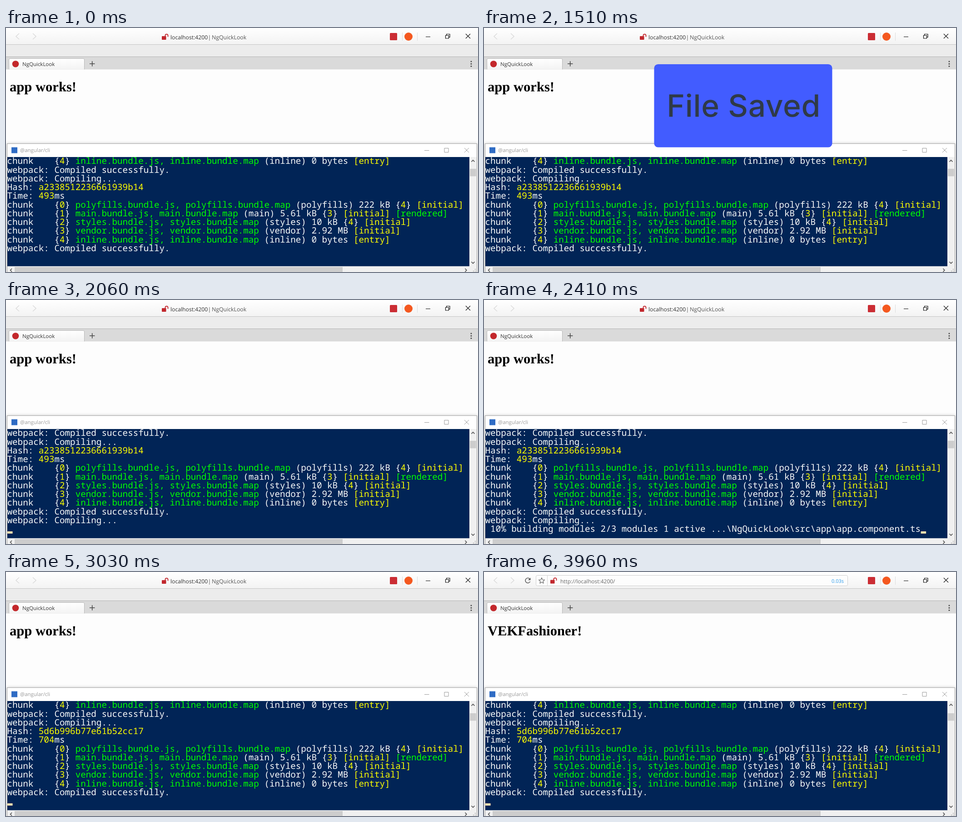
An HTML page for the animation above (5000 ms loop, 1039 px wide and 539 px high).

```html
<!DOCTYPE html>
<html lang="en">
<head>
<meta charset="utf-8">
<title>Live reload</title>
<style>
html, body { margin: 0; width: 100%; height: 100%; overflow: hidden; background: #fdfdfd; }
svg { display: block; width: 1039px; height: 539px; }
text { white-space: pre; text-rendering: geometricPrecision; }
.ui { font-family: "Open Sans", "Noto Sans", sans-serif; }
.page { font-family: "Liberation Serif", "Noto Serif", serif; fill: #000; }
.h1 { font-weight: bold; font-size: 30.6px; }
.term { font: 500 19.25px "Noto Sans Mono", "DejaVu Sans Mono", monospace; fill: #fafafa; }
.y { fill: #ff0; }
.g { fill: #0f0; }
.line { fill: none; stroke-width: 1.2; }
.window { filter: drop-shadow(0 0 3px rgba(0, 0, 0, .22)); }
</style>
</head>
<body>
<svg viewBox="0 0 1039 539">
  <defs>
    <linearGradient id="bar" x2="0" y2="1">
      <stop stop-color="#fff"/><stop offset="1" stop-color="#f3f3f3"/>
    </linearGradient>
    <g id="lock">
      <rect y="5" width="9.5" height="8" rx="1" fill="#c1272d"/>
      <path d="M7.5 6V3.6a3 3 0 0 1 6 0V6.5" class="line" stroke="#c1272d" style="stroke-width:1.8"/>
    </g>
  </defs>

  <!-- browser chrome -->
  <rect width="1039" height="539" fill="#fdfdfd"/>
  <rect width="1039" height="36" fill="url(#bar)"/>
  <rect y="36" width="1039" height="27" fill="#ececec"/>
  <rect y="36" width="1039" height="1" fill="#c4c4c4"/>
  <rect y="63" width="1039" height="28.5" fill="#dadada"/>
  <rect y="63" width="1039" height="1" fill="#b4b4b4"/>
  <path d="M6.5 91.5V70q0-2.5 2.5-2.5h161q2.5 0 2.5 2.5v21.5" fill="url(#bar)" stroke="#b8b8b8"/>
  <g class="line" stroke="#dcdcdc" style="stroke-width:1.6">
    <path d="M29 12l-7 6.5 7 6.5M59 12l7 6.5-7 6.5"/>
    <path d="M872.5 10v18M905.5 10v18" stroke-width="1"/>
  </g>
  <rect x="845" y="11" width="16" height="16" rx="1.5" fill="#cb2d34"/>
  <circle cx="886" cy="19" r="9" fill="#f4581f"/>
  <g class="line" stroke="#111">
    <path d="M924 19.5h10M1012 13l10 10M1022 13l-10 10"/>
    <path d="M967.5 16.5h7v6.5h-7zM969.5 16v-2.5h7.5v7h-2"/>
  </g>
  <path d="M184 79h11.5M189.7 73.3v11.5" class="line" stroke="#444" style="stroke-width:1.5"/>
  <g fill="#444"><circle cx="1024" cy="74" r="1.5"/><circle cx="1024" cy="79.3" r="1.5"/><circle cx="1024" cy="84.6" r="1.5"/></g>
  <text class="ui" x="36" y="83.5" font-size="11.5" fill="#333">NgQuickLook</text>
  <circle id="favicon" cx="21" cy="79.5" r="7.3" fill="#c3272b"/>
  <circle id="spinner" cx="21" cy="79.5" r="5.3" class="line" stroke="#666" style="stroke-width:1.6" stroke-dasharray="28 5.3"/>

  <g id="titleBar" class="ui">
    <use href="#lock" x="343" y="13"/>
    <text x="362" y="24.5" font-size="12.2" font-weight="500" fill="#333">localhost:4200</text>
    <text x="444.5" y="24.5" font-size="12.2" fill="#555">|</text>
    <text x="453" y="24.5" font-size="12.3" fill="#555">NgQuickLook</text>
  </g>
  <g id="urlBar" class="ui">
    <rect x="114.5" y="7.5" width="686" height="23" rx="3" fill="#fdfdfd" stroke="#cfcfcf"/>
    <path d="M139.5 8v22" stroke="#d4d4d4"/>
    <path id="star" class="line" stroke="#666" stroke-linejoin="round"/>
    <use href="#lock" x="146" y="12.5"/>
    <text x="168" y="24.5" font-size="12" fill="#666">http://localhost:4200/</text>
    <text id="loadTime" x="765" y="24" font-size="11" fill="#2e9bea">0.03s</text>
  </g>
  <path id="stop" d="M91 13.5l11 11M102 13.5l-11 11" class="line" stroke="#5a5a5a" style="stroke-width:1.5"/>
  <g id="reload">
    <path d="M101 15.5a5.5 5.5 0 1 0 .6 5.5" class="line" stroke="#5a5a5a" style="stroke-width:1.6"/>
    <path d="M102.5 12.5v5.5h-5.5z" fill="#5a5a5a"/>
  </g>

  <!-- page -->
  <g class="page">
    <text id="before" class="h1" x="8" y="139.5">app works!</text>
    <text id="loading" x="7.5" y="113" font-size="15.3">Loading...</text>
    <text id="after" class="h1" x="8" y="139.5">VEKFashioner!</text>
  </g>

  <!-- terminal window -->
  <rect class="window" x="2.5" y="255.5" width="1034" height="290" fill="#fff" stroke="#a6a6a6"/>
  <rect x="12" y="263.5" width="13" height="13" fill="#2f6cc4"/>
  <text class="ui" x="31" y="274" font-size="11.4" fill="#999">@angular/cli</text>
  <path d="M921 270.5h10.5M965 265.5h9v9h-9zM1009 265l10 10M1019 265l-10 10" class="line" stroke="#999" style="stroke-width:1"/>
  <rect x="3" y="285" width="1017" height="241.5" fill="#012456"/>
  <rect x="1020" y="285" width="16" height="254" fill="#f0f0f0"/>
  <rect x="3" y="526.5" width="1033" height="13" fill="#f0f0f0"/>
  <rect id="thumb" x="1021" y="311" width="14" height="16.5" fill="#cdcdcd"/>
  <rect x="19" y="528" width="722" height="11" fill="#cdcdcd"/>
  <path d="M1024.5 295.5l3.5-3.5 3.5 3.5M1024.5 516.5l3.5 3.5 3.5-3.5M13 531.5l-3.5 3.5 3.5 3.5M1010.5 531.5l3.5 3.5-3.5 3.5" class="line" stroke="#505050" style="stroke-width:1.6"/>
  <path d="M1032 533h2M1028 537h2M1032 537h2" stroke="#b5b5b5" stroke-width="2"/>
  <g id="screen" class="term"></g>
  <rect id="cursor" y="511" width="11.5" height="5" fill="#fbe0b0"/>

  <!-- notice -->
  <g id="notice">
    <rect x="383" y="87.5" width="362" height="169.5" rx="8" fill="#425cff"/>
    <text x="565" y="195" text-anchor="middle" font-family="Inter, Lato, sans-serif" font-size="62.5" font-weight="500" letter-spacing=".6" fill="#2f3a47">File Saved</text>
  </g>
</svg>

<script>
const LOOP = 5000, CELL = 11.55, ROW = 19.27, LEFT = 2.5;
const $ = id => document.getElementById(id);
const show = (id, on) => { $(id).style.display = on ? "" : "none"; };

// terminal log
const paint = (c, s) => `<tspan class="${c}">${s}</tspan>`;
const y = s => paint("y", s), g = s => paint("g", s);
const chunk = (id, name, size, parent, flags) =>
  `chunk    {${y(id)}} ${g(`${name}.bundle.js, ${name}.bundle.map`)} (${name}) ${size} ` +
  (parent ? `{${y(parent)}} ` : "") + flags;
const first = y("[initial]");
const chunks = [
  chunk(0, "polyfills", "222 kB", 4, first),
  chunk(1, "main", "5.61 kB", 3, `${first} ${g("[rendered]")}`),
  chunk(2, "styles", "10 kB", 4, first),
  chunk(3, "vendor", "2.92 MB", 0, first),
  chunk(4, "inline", "0 bytes", 0, y("[entry]"))
];
const build = (hash, ms) => [
  "webpack: Compiling...", `Hash: ${y(hash)}`, `Time: ${y(ms)}ms`,
  ...chunks, "webpack: Compiled successfully."
];
const log = [
  chunks[4], "webpack: Compiled successfully.",
  ...build("a2338512236661939b14", 493),
  ...build("5d6b996b77e61b52cc17", 704)
];
const modules = n => ` 10% building modules ${n}/${n + 1} modules 1 active ` +
  String.raw`...\NgQuickLook\src\app\app.component.ts`;

// time, first visible log line, progress line (null hides the cursor)
const steps = [
  [0, 0, null],
  [2020, 1, null],
  [2060, 1, ""],
  [2310, 1, " 10% building modules"],
  [2340, 1, modules(0)],
  [2380, 1, modules(1)],
  [2410, 1, modules(2)],
  [2440, 1, modules(3)],
  [2820, 1, " 80% module reviving"],
  [2860, 1, " 84% chunk order optimization"],
  [2900, 1, " 88% chunk assets processing"],
  [2940, 1, " 91% additional asset processing"],
  [2980, 1, " 95% emitting"],
  [3020, 9, ""]
];

let shown;
function drawTerminal(t) {
  const step = steps.filter(s => s[0] <= t).pop();
  if (step === shown) return;
  shown = step;
  const [, top, tail] = step;
  const rows = [...log.slice(top, top + 11), tail || ""];
  $("screen").innerHTML = rows.map((s, i) =>
    `<text x="${LEFT}" y="${(300.3 + i * ROW).toFixed(2)}">${s}</text>`).join("");
  show("cursor", tail !== null);
  $("cursor").setAttribute("x", LEFT + 0.5 + (tail || "").length * CELL);
  $("thumb").setAttribute("y", top > 1 ? 312 : 311);
}

const ease = x => {
  x = Math.min(1, Math.max(0, x));
  return x * x * (3 - 2 * x);
};

function drawNotice(t) {
  show("notice", t >= 1000 && t < 1960);
  const k = ease((t - 1000) / 520) - ease((t - 1560) / 370);
  $("notice").setAttribute("transform",
    `translate(${564 + 6.5 * k} ${172 - 0.5 * k}) scale(${1 + 0.083 * k}) translate(-564 -172)`);
}

function drawBrowser(t) {
  const started = t >= 3100, done = t >= 3930, busy = started && !done;
  show("titleBar", !started);
  show("urlBar", started);
  show("stop", busy);
  show("spinner", busy);
  show("favicon", !busy);
  show("reload", done);
  show("loadTime", t >= 3960);
  show("before", t < 3180);
  show("loading", t >= 3260 && !done);
  show("after", done);
  $("spinner").setAttribute("transform", `rotate(${(t - 3340) * 0.36} 21 79.5)`);
}

const star = Array.from({ length: 10 }, (_, i) => {
  const a = i * Math.PI / 5, r = i % 2 ? 3.1 : 6.8;
  return `${127 + r * Math.sin(a)} ${19.5 - r * Math.cos(a)}`;
});
$("star").setAttribute("d", `M${star.join("L")}Z`);

const start = performance.now();
function frame() {
  const t = (performance.now() - start) % LOOP;
  drawTerminal(t);
  drawNotice(t);
  drawBrowser(t);
  requestAnimationFrame(frame);
}
frame();
</script>
</body>
</html>
```
